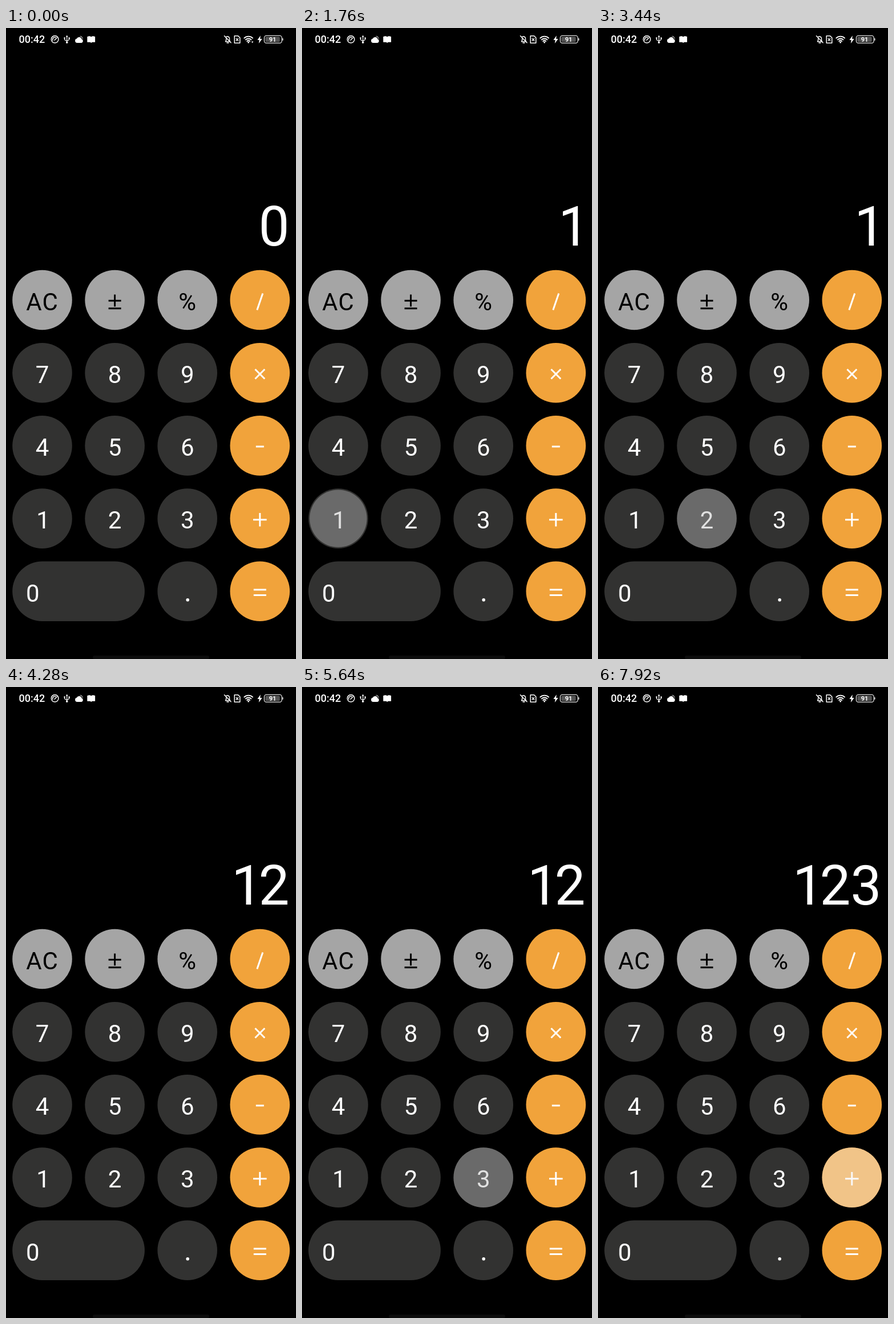
An HTML page that plays this animation: 508x1102 px, repeating every 8000 ms.

```html
<!DOCTYPE html>
<html lang="en">
<head>
<meta charset="utf-8">
<title>Calculator</title>
<style>
  html, body { margin: 0; width: 100%; height: 100%; overflow: hidden; background: #000; }
  svg { display: block; width: 100%; height: 100%; }
  text { font-family: Roboto, "Noto Sans", sans-serif; fill: #fff; }
  .line { fill: none; stroke: #fff; stroke-width: 1.5; stroke-linecap: round; stroke-linejoin: round; }
  .label { font-size: 42px; text-anchor: middle; }
  .digit { font-size: 96px; text-anchor: middle; }
</style>
</head>
<body>
<svg viewBox="0 0 508 1102" xmlns="http://www.w3.org/2000/svg">
  <rect width="508" height="1102"/>
  <g id="status" fill="#fff">
    <text x="22.5" y="26.2" font-size="18" font-weight="500">00:42</text>
    <circle class="line" cx="85.6" cy="19.8" r="6.3"/>
    <path class="line" stroke-width="1.2" d="M81.8 21.5a4 4 0 0 1 5.2-5M85 21.2l4-4"/>
    <path class="line" style="stroke-width:1.2" d="M106.7 14V25M102.6 18v2.6l4.1 2.4 4-2.8V18"/>
    <path d="M104.7 15.6l2-2.9 2 2.9z"/>
    <circle cx="106.7" cy="25.3" r="1.7"/><circle cx="102.6" cy="17.6" r="1.3"/><rect x="109.5" y="16.5" width="2.4" height="2.4"/>
    <path d="M124.5 26a3.8 3.8 0 0 1-.4-7.5 4.6 4.6 0 0 1 8.5 1 3.4 3.4 0 0 1-.3 6.5z"/>
    <path d="M128.5 14.2a4.6 4.6 0 0 1 5.6 6 6 6 0 0 0-5.6-6z"/>
    <path d="M142.3 15.2q4.4-2 6.9.3 2.5-2.3 6.9-.3v9.6h-5.2l-1.7 1.3-1.7-1.3h-5.2z"/>
    <path class="line" d="M384.5 23.8h8.2l-1.2-2.1v-3.2a3.7 3.7 0 0 0-5.8-3M384.5 23.8l1.2-2.4v-3M387 26h3M382.5 13.8l11.6 12"/>
    <path class="line" d="M400.2 13.7h6.3l3.3 3.4v9.1h-9.6zM403.2 18.6l3.5 3.6m0-3.6l-3.5 3.6"/>
    <path class="line" style="stroke-width:1.9" d="M417.3 17.6a10.8 10.8 0 0 1 14.8 0M419.9 20.4a7 7 0 0 1 9.6 0M422.3 23a3.5 3.5 0 0 1 4.8 0"/>
    <circle cx="424.7" cy="25.1" r="1.5"/>
    <path id="traffic" d="M429.8 23.5h3.6l-1.8 2.7z"/>
    <path d="M445.8 13.2l-5.4 7.7h3.3l-.9 6 5.9-8h-3.5z"/>
    <rect x="452.4" y="13.4" width="30.7" height="13" rx="3.6" fill="none" stroke="#ddd" stroke-width="1.3"/>
    <rect x="454.2" y="15.2" width="25.5" height="9.4" rx="2" fill="#555"/>
    <path d="M484.2 17.5q1.4 0 1.4 2.4t-1.4 2.4z"/>
    <text x="467" y="23.9" font-size="11" font-weight="700" text-anchor="middle">91</text>
  </g>
  <g id="display"></g>
  <g id="keys"></g>
  <rect x="152" y="1096" width="204" height="6" rx="3" fill="#0c0c0c"/>
</svg>
<script>
const LOOP = 8000, RADIUS = 52.3, STEP = 127.1;
const ENTER = 300, EXIT = 300, RIPPLE_ALPHA = 0.42;

const ROWS = [['AC', '±', '%', '/'], ['7', '8', '9', '×'], ['4', '5', '6', '-'], ['1', '2', '3', '+'], ['0', null, '.', '=']];

// Symbol strokes, relative to the key centre
const SYMBOLS = {
  '±': 'M-11 1.2H11M0-9.4V11.5M-11 14.8H11',
  '/': 'M5-11.5L-5 17.6',
  '×': 'M-8.4-6.2L8.4 10.6M8.4-6.2L-8.4 10.6',
  '-': 'M-7 1.6H7',
  '+': 'M-11.8 2.2H11.8M0-9.6V14',
  '=': 'M-11-2.8H11M-11 6.6H11'
};

const PRESSES = [
  { key: '1', down: 1580, up: 1880 },
  { key: '2', down: 3160, up: 3760 },
  { key: '3', down: 4980, up: 5960 },
  { key: '+', down: 7340, up: Infinity }
];
const READOUTS = [[0, '0'], [1460, '1'], [3760, '12'], [5960, '123']];

const find = id => document.getElementById(id);
const clamp = v => Math.min(1, Math.max(0, v));
const easeOut = v => 1 - (1 - v) ** 3;

function add(parent, tag, attributes, content = '') {
  const node = document.createElementNS('http://www.w3.org/2000/svg', tag);
  for (const name in attributes) node.setAttribute(name, attributes[name]);
  node.textContent = content;
  return parent.appendChild(node);
}

const ripples = {};

function addKey(name, column, row) {
  const x = 63.5 + column * STEP, y = 475 + row * 127.2;
  const key = add(find('keys'), 'g', { transform: `translate(${x} ${y})` });
  const isOperator = column === 3, isGrey = row === 0 && !isOperator;
  const fill = isOperator ? '#f1a33b' : isGrey ? '#a5a5a5' : '#323231';
  const ink = isGrey ? '#000' : '#fff';
  add(key, 'rect', {
    x: -RADIUS, y: -RADIUS, width: 2 * RADIUS + (name === '0' ? STEP : 0),
    height: 2 * RADIUS, rx: RADIUS, fill
  });
  if (SYMBOLS[name]) {
    add(key, 'path', { d: SYMBOLS[name], fill: 'none', stroke: ink, 'stroke-width': 3 });
  } else if (name === '.') {
    add(key, 'circle', { cx: 0.5, cy: 15, r: 2.8, fill: ink });
  } else {
    const shift = { '0': -16.8, '1': 1.5 }[name] || 0;
    add(key, 'text', {
      class: 'label', x: shift, y: 17.8, style: `fill:${ink}`,
      'letter-spacing': name === 'AC' ? 1 : 0
    }, name);
  }
  ripples[name] = add(key, 'circle', { r: 0, fill: isOperator ? '#f1f0f4' : '#b7b7b7' });
}

ROWS.forEach((names, row) => names.forEach((name, column) => name && addKey(name, column, row)));

let shown = '';
function showNumber(number) {
  if (number === shown) return;
  shown = number;
  find('display').textContent = '';
  [...number].reverse().forEach((digit, place) => {
    const x = 469.5 - 54 * place + (digit === '1' ? 6.5 : 0);
    add(find('display'), 'text', { class: 'digit', x, y: 379.5 }, digit);
  });
}

function render(t) {
  showNumber(READOUTS.filter(([start]) => t >= start).pop()[1]);
  for (const { key, down, up } of PRESSES) {
    const alpha = clamp((t - down) / 100) * (1 - clamp((t - up) / EXIT));
    ripples[key].setAttribute('r', RADIUS * (0.35 + 0.65 * easeOut(clamp((t - down) / ENTER))));
    ripples[key].setAttribute('opacity', RIPPLE_ALPHA * alpha);
  }
  const receiving = t < 500 || (t >= 5960 && t < 7340);
  find('traffic').setAttribute('opacity', receiving ? 1 : 0);
}

const begin = performance.now();
function tick() {
  render((performance.now() - begin) % LOOP);
  requestAnimationFrame(tick);
}
tick();
</script>
</body>
</html>
```
